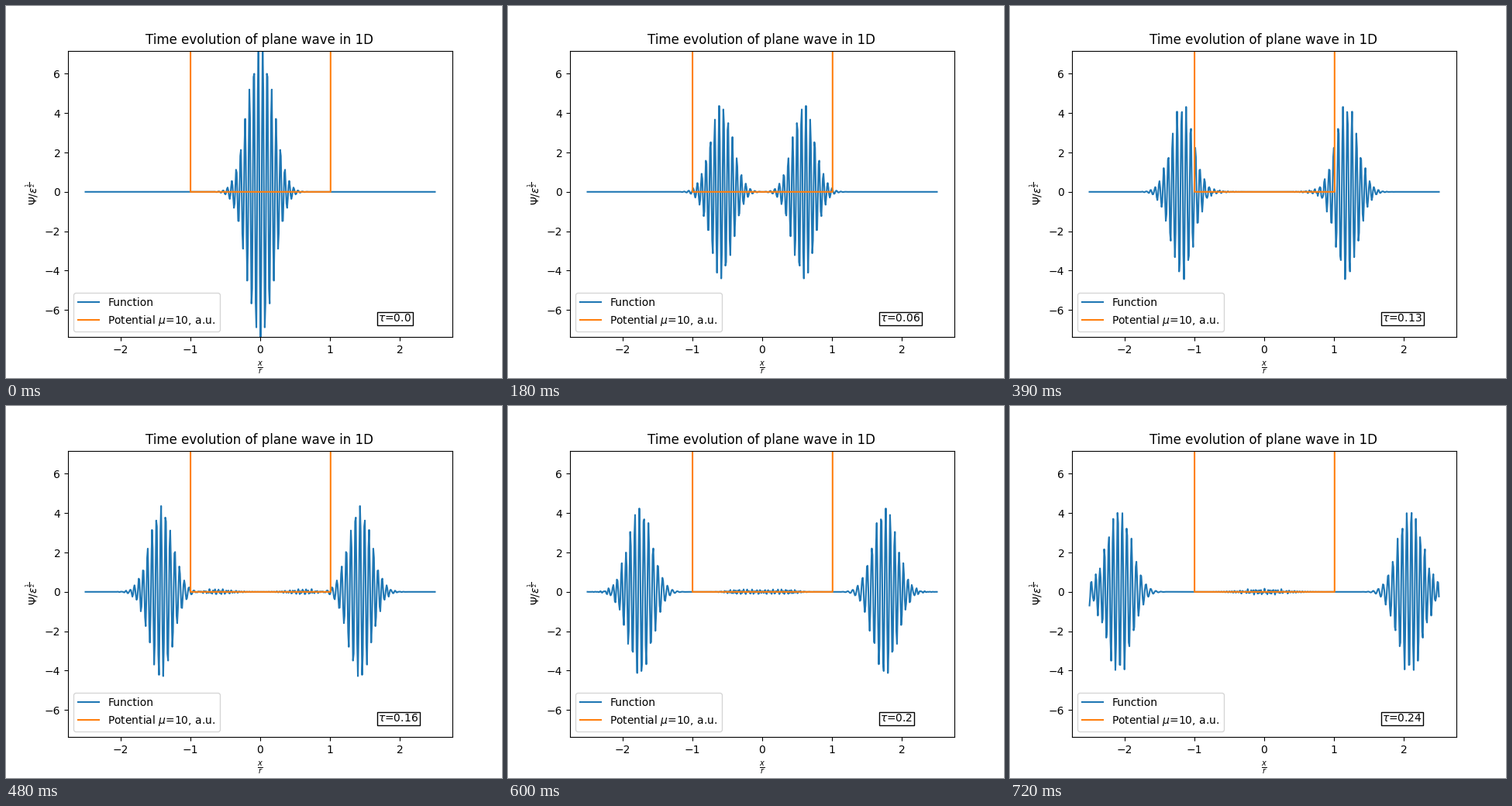
Animation of 640x480 px, one loop 0.75 s. Source, as a matplotlib script:

```python
import numpy as np
import matplotlib.pyplot as plt
from matplotlib.animation import FuncAnimation

FRAMES = 25
INTERVAL = 30
STEP = 0.01          # tau per frame
LEAD = 0.0097        # time already elapsed when the loop starts

# Ring of lattice sites, centred on site N/2, and the axis it is drawn on
N = 500
DX = 0.01
sites = (np.arange(N) - N // 2) * DX
x = np.linspace(-2.5, 2.5, N)
outside = np.abs(sites) > 1 + DX / 2

# Split-step evolution: lattice kinetic energy, then one potential kick
POTENTIAL = 25
ENERGY_SHIFT = -112.7
theta = 2 * np.pi * np.fft.fftfreq(N)
kinetic = 0.1 / DX**2 * (1 - np.cos(theta)) + ENERGY_SHIFT
kick = np.exp(-1j * POTENTIAL * outside * STEP)


def drift(psi, t):
    """Free motion on the ring for a time t."""
    return np.fft.ifft(np.exp(-1j * kinetic * t) * np.fft.fft(psi))


def evolve():
    """Real part of the wave function in every frame."""
    psi = 9.0 * np.exp(-sites**2 / 0.05) * np.cos(100 * sites)
    psi = drift(psi, LEAD)
    waves = []
    for _ in range(FRAMES):
        waves.append(psi.real)
        psi = kick * drift(psi, STEP)
    return waves


waves = evolve()

fig, ax = plt.subplots(figsize=(6.4, 4.8), dpi=100)
line, = ax.plot(x, waves[0], label="Function")
ax.plot(x, 1000 * outside, label=r"Potential $\mu$=10, a.u.")
ax.set_xlim(-2.75, 2.75)
ax.set_ylim(-7.377, 7.173)
ax.set_title("Time evolution of plane wave in 1D", x=0.4985)
ax.set_xlabel(r"$\frac{x}{r}$")
ax.set_ylabel(r"$\Psi/\varepsilon^{\frac{1}{2}}$")
ax.legend(loc="lower left")
clock = ax.text(1.69, -6.6, "", bbox=dict(boxstyle="square,pad=0.1",
                                          facecolor="white", edgecolor="black"))


def update(i):
    line.set_ydata(waves[i])
    clock.set_text(rf"$\tau$={round(i * STEP, 2)}")
    return line, clock


anim = FuncAnimation(fig, update, frames=FRAMES, interval=INTERVAL,
                     repeat=True, repeat_delay=0)
plt.show()
```
